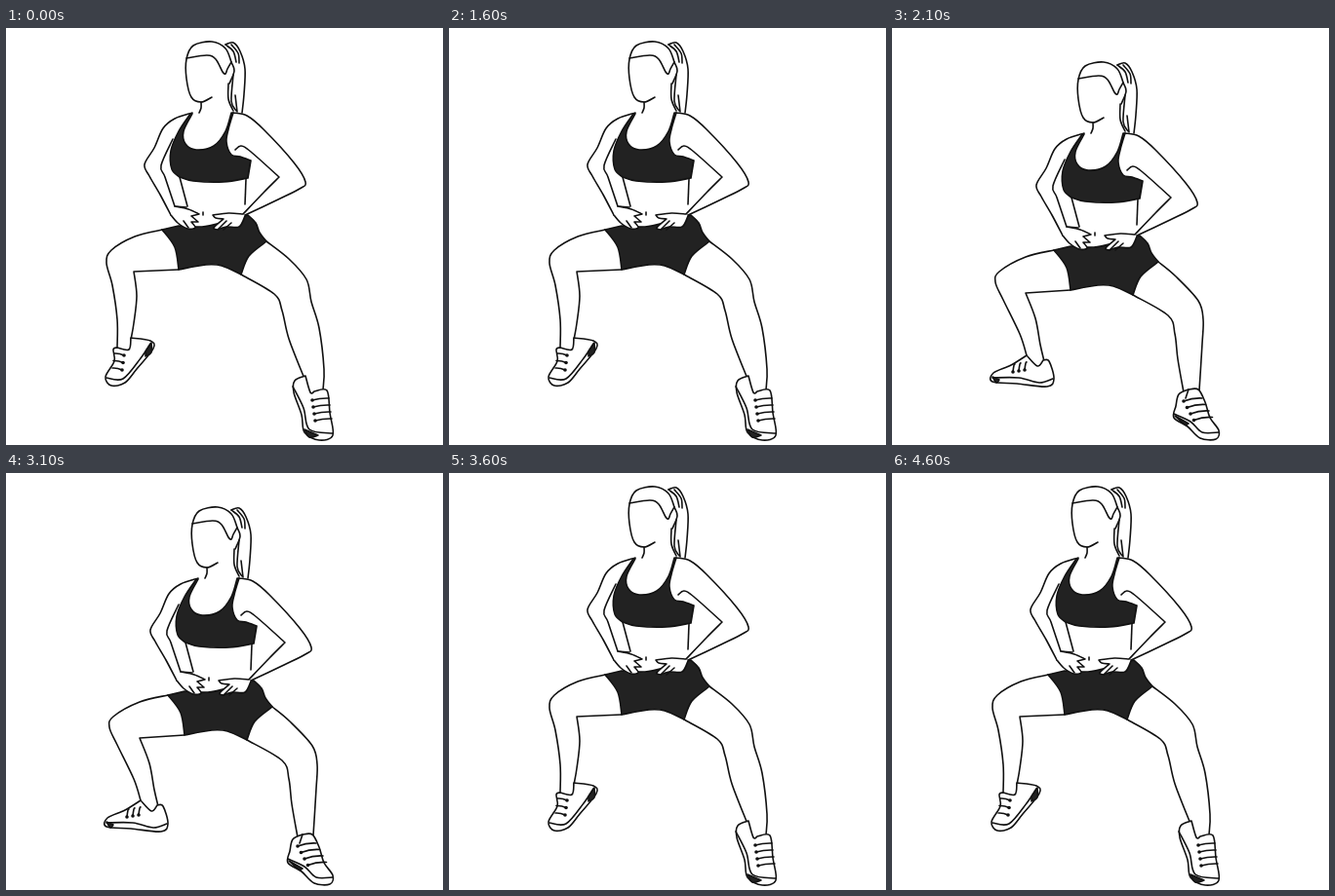
An HTML page that plays this animation: 448x428 px, repeating every 5100 ms.

```html
<!DOCTYPE html>
<html lang="en">
<head>
<meta charset="utf-8">
<title>Sumo squat</title>
<style>
  html, body { margin: 0; width: 100%; height: 100%; overflow: hidden; background: #fff; }
  svg { display: block; width: 100vw; height: 100vh; }
  path { fill: none; stroke: #111; stroke-width: 1.6; stroke-linecap: round; stroke-linejoin: round; }
  .skin { fill: #fff; }
  .cloth { fill: #222; }
  .dot { stroke-width: 3.6; }
</style>
</head>
<body>
<svg viewBox="0 0 448 428">
  <g id="up"></g>
  <g id="down"></g>
</svg>
<script>
const START = 1100, BEAT = 500, LOOP = 5100;

// Smooth curve through "x,y" key points; "/" makes a corner at the last point.
function curve(text) {
  let d = "", last = null;
  for (const run of text.split("/")) {
    const p = run.trim().split(" ").map(s => s.split(",").map(Number));
    if (last) p.unshift(last);
    else d = "M" + p[0];
    for (let i = 0; i < p.length - 1; i++) {
      const a = p[i - 1] || p[i], b = p[i], c = p[i + 1], e = p[i + 2] || c;
      const h1 = b.map((v, k) => v + (c[k] - a[k]) / 6);
      const h2 = c.map((v, k) => v - (e[k] - b[k]) / 6);
      d += `C${h1} ${h2} ${c}`;
    }
    last = p[p.length - 1];
  }
  return d;
}
const path = (d, cls = "") => `<path class="${cls}" d="${d}"/>`;
const fill = (cls, text) => path(curve(text), cls);
const lines = (...list) => list.map(s => path(curve(s))).join("");

// n eyelets from (x,y), each a step further, with a bowed lace running off it.
function laces(n, [x, y], [sx, sy], [lx, ly]) {
  let out = "";
  for (let i = 0; i < n; i++) {
    const at = `M${x + i * sx},${y + i * sy}`;
    out += path(`${at}q${lx / 2},${ly * 1.2} ${lx},${ly}`) + path(at + "h.01", "dot");
  }
  return out;
}

const head = lines(
  "211,71 200,76 190,71 185,52 185,32 192,18 211,14 225,21 231,35 234,44 229,57",
  "185,31 206,28 215,32 222,45 225,47 227,42 231,35",
  "225,17 233,15 240,24 245,42 244,68 242,87",
  "225,17 233,24 236,35", "231,17 238,26 239,36",
  "233,48 231,75 236,85", "235,69 237,86",
  "200,76 200,82 198,87", "228,57 228,73 233,85");

const arms = lines(
  "191,87 173,93 161,103 152,123 142,140 147,152 158,171 169,192",
  "171,114 159,141 163,153 173,183 / 185,184",
  "233,87 247,90 264,104 295,138 307,158 301,165 279,176 243,193",
  "235,125 241,121 251,127 280,153 / 264,169 243,191",
  "178,153 186,183", "246,155 245,181");

const bra = fill("cloth",
  "189,88 177,106 169,126 170,145 178,153 / 192,157 223,158 248,154 / 251,136" +
  " / 240,132 231,130 226,117 228,104 233,87 / 231,87" +
  " / 225,106 213,121 195,125 184,119 182,106 191,88 / 189,88");

const shorts = fill("cloth",
  "160,207 177,203 / 201,204 225,199 / 248,192 / 256,200 260,210 267,219" +
  " / 249,234 241,253 / 221,244 205,243 177,248 / 173,225 160,207");

const hands = fill("skin",
    "173,183 187,186 198,191 / 190,193 / 197,199 / 190,199 / 194,205 186,206 176,200 169,192") +
  fill("skin",
    "243,191 228,190 212,192 / 215,195 223,196 / 213,205 217,207 / 226,204 239,204 245,193") +
  lines("182,198 187,205", "226,198 217,207", "231,200 223,207", "202,189 202,192");

const body = head + arms + bra + shorts + hands;

const legsUp = lines(
  "160,207 132,214 108,228 103,241 109,264 114,299 114,328",
  "177,248 131,250 / 134,275 131,303 128,320",
  "267,219 290,237 308,258 313,281 321,308 326,350 325,371",
  "241,253 275,273 283,290 290,319 306,360");

const shoesUp =
  fill("skin", "114,328 110,330 111,342 102,358 108,367 122,364 134,350 151,329 148,321 128,318 / 126,330 114,328") +
  lines("148,324 138,339 120,360 103,359") +
  laces(3, [121, 336], [-1, 7.5], [-10, -2]) +
  fill("cloth", "143,332 149,323 / 149,333 143,337 / 143,332") +
  fill("skin", "307,357 296,362 295,374 303,397 306,415 321,423 335,418 332,395 329,372 316,373 / 312,374 307,357") +
  lines("294,368 305,390 311,412 335,416") +
  laces(4, [314, 382], [1, 7], [17, -2]) +
  fill("cloth", "306,412 320,418 / 311,420 306,412");

const legsDown = lines(
  "166,228 137,235 110,250 106,261 114,279 131,314 138,336",
  "183,269 137,272 / 147,298 152,325 156,342",
  "273,240 291,255 314,280 319,299 318,324 315,372",
  "247,274 283,295 290,314 293,340 299,374");

const shoesDown =
  fill("skin", "138,336 122,346 104,354 103,363 128,365 159,368 166,360 161,342 155,341 / 149,347 138,336") +
  lines("103,359 130,359 151,364 165,360") +
  laces(3, [124, 353], [6, -1], [2, -8]) +
  fill("cloth", "103,358 110,361 / 107,364 103,358") +
  fill("skin", "304,371 294,376 291,388 289,400 303,409 316,421 332,422 335,413 326,400 321,384 314,371 304,371") +
  lines("289,396 306,404 318,415 335,415", "304,371 301,380") +
  laces(4, [299, 383], [3.5, 6.5], [19, -3]) +
  fill("cloth", "290,398 304,406 / 300,407 290,398");

const up = document.getElementById("up"), down = document.getElementById("down");
up.innerHTML = legsUp + shoesUp + body;
down.innerHTML = legsDown + shoesDown + `<g transform="translate(6 21)">${body}</g>`;

const begin = performance.now();
function tick() {
  const t = (performance.now() - begin) % LOOP;
  const low = t >= START && Math.floor((t - START) / BEAT) % 2 === 0;
  up.style.display = low ? "none" : "";
  down.style.display = low ? "" : "none";
  requestAnimationFrame(tick);
}
tick();
</script>
</body>
</html>
```
